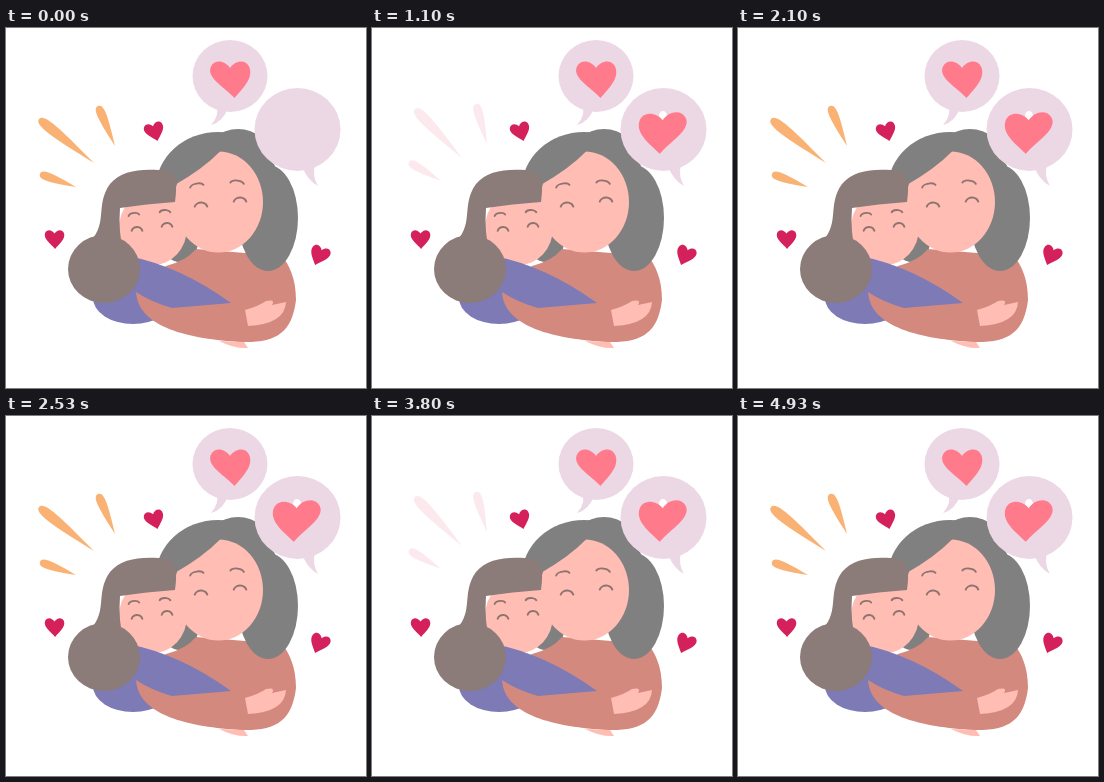
Animation, 360 px wide and 360 px high, one loop 5000 ms. Source, as an HTML page with a canvas:

```html
<!DOCTYPE html>
<html lang="en">
<head>
<meta charset="utf-8">
<title>Hug</title>
<style>
html, body { margin: 0; width: 100%; height: 100%; overflow: hidden; background: #fff; }
canvas { display: block; width: 360px; height: 360px; }
</style>
</head>
<body>
<canvas id="stage" width="360" height="360"></canvas>
<script>
const ctx = document.getElementById('stage').getContext('2d');
const LOOP = 5000, RAY_LOOP = 2500;
const SKIN = '#ffbdb3', GREY = '#808080', BROWN = '#8b7b79', SWEATER = '#d3897e',
  DRESS = '#7d7ab6', BUBBLE = '#ecd8e5', PINK = '#ff7b8c', RED = '#d5215b', LINE = '#8d7472';

const clamp = x => Math.max(0, Math.min(1, x));
const mix = (a, b, k) => a + (b - a) * k;
const smooth = x => { x = clamp(x); return x * x * (3 - 2 * x); };
const easeOut = x => 1 - (1 - clamp(x)) ** 2;

// Runs paint in a moved, turned and scaled frame.
function placed(x, y, angle, sx, sy, paint) {
  ctx.save();
  ctx.translate(x, y);
  ctx.rotate(angle);
  ctx.scale(sx, sy);
  paint();
  ctx.restore();
}

function oval(color, x, y, rx, ry) {
  ctx.fillStyle = color;
  ctx.beginPath();
  ctx.ellipse(x, y, rx, ry, 0, 0, 2 * Math.PI);
  ctx.fill();
}

function shape(color, path) {
  ctx.fillStyle = color;
  ctx.fill(new Path2D(path));
}

// Upper half of an ellipse, slightly turned: closed eyes and brows.
function arch(x, y, rx, ry, angle) {
  ctx.beginPath();
  ctx.ellipse(x, y, rx, ry, angle, Math.PI * 1.08, Math.PI * 1.92);
  ctx.stroke();
}

// lean shifts the lower tip sideways, as a share of the width.
function heart(color, x, y, w, h, angle, lean, scale = 1) {
  placed(x, y, angle, w * scale, h * scale, () => {
    ctx.fillStyle = color;
    ctx.beginPath();
    ctx.moveTo(0, -.31);
    for (const side of [1, -1]) {
      const end = side > 0 ? [lean, .5] : [0, -.31];
      const lobe = [.12, -.52, .38, -.56, .47, -.34].map((v, i) => i % 2 ? v : v * side);
      if (side > 0) {
        ctx.bezierCurveTo(...lobe);
        ctx.bezierCurveTo(.58, -.04, lean + .2, .24, ...end);
      } else {
        ctx.bezierCurveTo(lean - .2, .24, -.58, -.04, lobe[4], lobe[5]);
        ctx.bezierCurveTo(lobe[2], lobe[3], lobe[0], lobe[1], ...end);
      }
    }
    ctx.fill();
  });
}

// Teardrop with a round outer end and a sharp inner tip.
function ray(color, [x0, y0], [x1, y1], width) {
  const length = Math.hypot(x1 - x0, y1 - y0);
  placed(x0, y0, Math.atan2(y1 - y0, x1 - x0), length, width, () =>
    shape(color, 'M0 0C0-.7.3-.55 1 0C.3.55 0 .7 0 0'));
}

function rays(t) {
  const p = t % RAY_LOOP;
  const k = p < 1000 ? smooth((p - 80) / 320) : 1 - smooth((p - 1660) / 280);
  const color = `rgb(${mix(249, 252, k)},${mix(178, 233, k * k)},${mix(115, 237, k)})`;
  const slide = (a, b) => a.map((v, i) => mix(v, b[i], k));
  ray(color, slide([33, 91], [43, 81]), slide([88, 135], [90, 130]), 11);
  ray(color, slide([92, 78], [104, 76]), slide([109, 118], [115, 116]), 9.5);
  ray(color, slide([34, 146], [37, 134]), slide([70, 159], [69, 153]), 9);
}

function family() {
  oval(GREY, 212, 160, 62, 56);
  oval(GREY, 232, 130, 33, 29);
  oval(GREY, 174, 214, 18, 20);
  oval(DRESS, 127, 270, 40, 26);
  shape(SWEATER, 'M190 221Q180 233 160 238L130 262C130 300 185 311 235 314C270 315 286 305 290 272C290 250 283 237 276 228Z');
  oval(GREY, 262, 190, 30, 53);
  oval(SKIN, 212.5, 174, 44.5, 50.5);
  shape(GREY, 'M214 123.5Q197 141 167 158L163 130L190 112L214 108Z');

  oval(SKIN, 147, 200, 34, 37);
  shape(DRESS, 'M122 228Q174 238 225 275L166 280Q145 274 130 264Z');
  oval(BROWN, 98, 241, 36, 34);
  shape(BROWN, 'M169 174Q140 176 114 180Q112 205 118 225L80 217C104 198 88 178 104 156C116 141 140 140 162 143Q173 146 169 174Z');

  shape(SKIN, 'M239 282Q253 278 260 273Q270 271 266 277L280 274Q279 296 242 298Z');
  shape(SKIN, 'M213 313L238 314L242 320Q229 321 213 313Z');
}

function faces() {
  ctx.strokeStyle = LINE;
  ctx.lineWidth = 1.9;
  ctx.lineCap = 'round';
  arch(191, 159, 7, 3.5, -.2);
  arch(231, 156, 7, 3.5, .1);
  arch(195, 180, 6.5, 5.5, 0);
  arch(234, 175, 6.5, 5.5, 0);
  arch(128, 188, 5.5, 3, -.15);
  arch(159, 185, 5.5, 3, 0);
  arch(131, 204, 5.5, 5, 0);
  arch(161, 200, 5.5, 5, 0);
}

function bubbles(t) {
  oval(BUBBLE, 224, 48, 37.5, 36);
  shape(BUBBLE, 'M210 78Q214 87 205 97Q217 94 222 80Z');
  oval(BUBBLE, 291.5, 101.5, 43, 41.5);
  shape(BUBBLE, 'M296 138Q301 152 312 158Q306 148 309 136Z');
  const first = t < 4150 ? 1 : easeOut((t - 4150) / 300);
  const second = easeOut((t - 40) / 300);
  heart(PINK, 224, 51.5, 41, 37, 0, .11, first);
  if (second > .9) oval('#fff', 291, 88, 4, 5);
  heart(PINK, 291.5, 105, 49, 41, -.06, -.1, second);
}

function draw(t) {
  ctx.fillStyle = '#fff';
  ctx.fillRect(0, 0, 360, 360);
  rays(t);
  family();
  faces();
  bubbles(t);
  heart(RED, 148.5, 104, 20, 19, -.25, .03);
  heart(RED, 48.5, 211.5, 20, 19, 0, .03);
  heart(RED, 313.5, 228, 20, 20, .35, -.05);
}

const start = performance.now();
function tick() {
  draw((performance.now() - start) % LOOP);
  requestAnimationFrame(tick);
}
tick();
</script>
</body>
</html>
```
